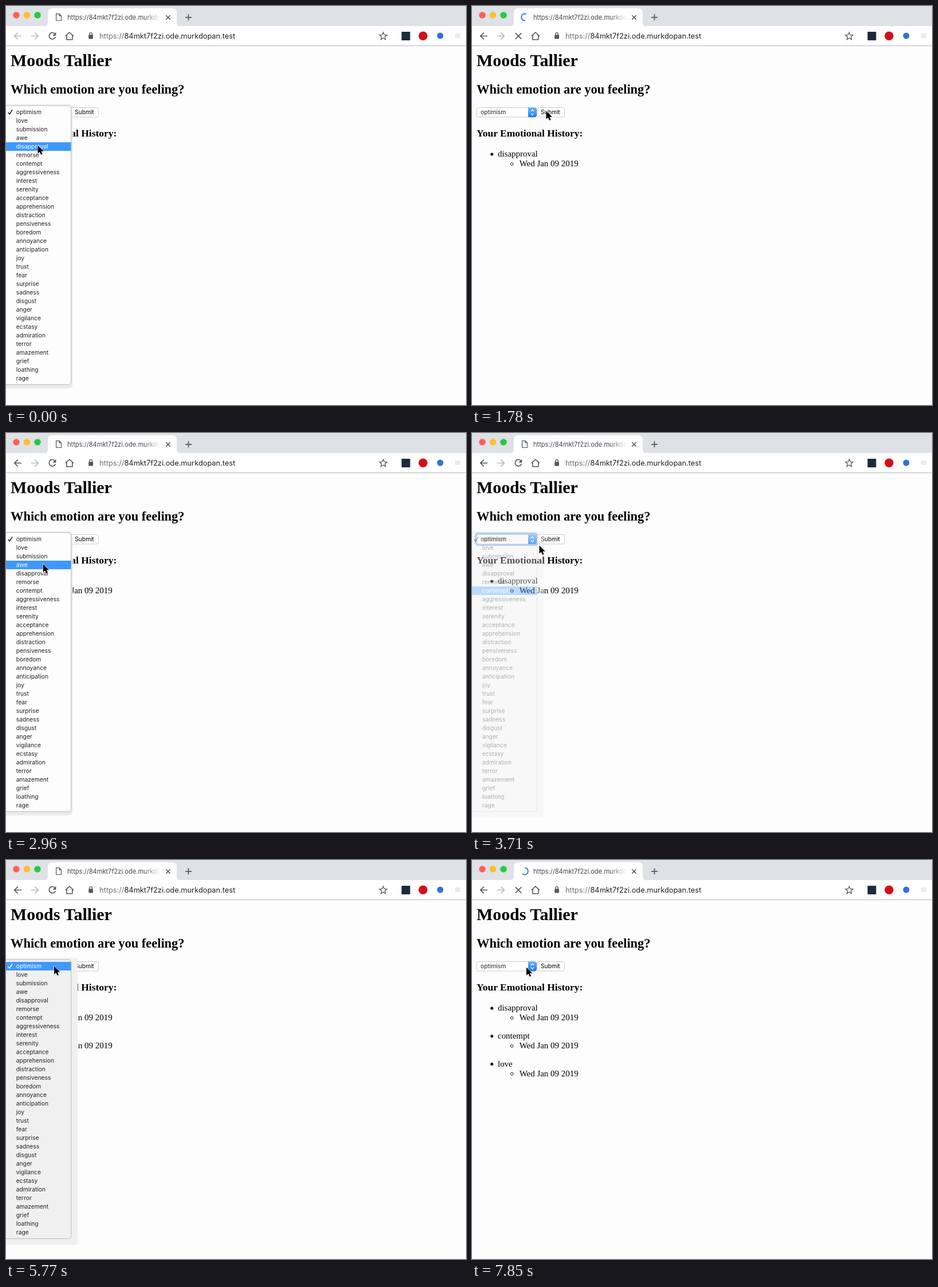
Write an HTML page that moves like this. It is 803 px wide and 697 px high and loops after 8000 ms.

```html
<!DOCTYPE html>
<html lang="en">
<head>
<meta charset="utf-8">
<title>Moods Tallier</title>
<style>
  html, body { margin: 0; width: 100%; height: 100%; overflow: hidden; background: #fdfdfd; }
  svg { display: block; }
  .ui { font: 10.25px Inter, "Open Sans", sans-serif; fill: #222; }
  .page { font: 14.95px "Liberation Serif", serif; fill: #000; }
  .h1 { font-size: 29.9px; font-weight: 700; }
  .h2 { font-size: 22.43px; font-weight: 700; }
  .h3 { font-size: 17.5px; font-weight: 700; }
  .tab { font-size: 11.1px; fill: #44474b; }
  .url { font-size: 12.8px; fill: #202124; }
  .icon { fill: none; stroke: #55585c; stroke-width: 1.7; }
  .on { fill: #fff; }
</style>
</head>
<body>
<svg width="803" height="697" viewBox="0 0 803 697">
  <defs>
    <linearGradient id="fade"><stop stop-color="#fff" stop-opacity="0"/><stop offset="1" stop-color="#fff"/></linearGradient>
    <linearGradient id="blue" x2="0" y2="1"><stop stop-color="#6cb5fb"/><stop offset="1" stop-color="#1679f4"/></linearGradient>
  </defs>
  <rect width="803" height="697" fill="#fdfdfd"/>

  <g id="browser">
    <rect width="803" height="36" fill="#dee1e6"/>
    <rect y="35" width="803" height="34" fill="#fff"/>
    <path d="M0 69.5H803" stroke="#b4b6b8"/>
    <path d="M65 36Q73 36 73 28V12Q73 4 81 4H290Q298 4 298 12V28Q298 36 306 36Z" fill="#fff"/>
    <circle cx="18" cy="16" r="5.8" fill="#ff5f57"/>
    <circle cx="36.5" cy="16" r="5.8" fill="#ffbd2e"/>
    <circle cx="55" cy="16" r="5.8" fill="#28c940"/>
    <path id="doc" class="icon" stroke-width="1.2" style="stroke-width:1.2" d="M87.6 13.6H93L96.5 17.2V25.5H87.6ZM93 13.6V17.2H96.5"/>
    <path id="spin" class="icon" style="stroke-width:2" d="M0.5 -6A6 6 0 1 1 -4 4.5"/>
    <text class="ui tab" x="107" y="23.5">https://84mkt7f2zi.ode.murkdo</text>
    <rect x="240" y="10" width="30" height="20" fill="url(#fade)"/>
    <path class="icon" style="stroke-width:1.5" d="M279.3 16.2l7.4 7.4m0-7.4l-7.4 7.4"/>
    <path class="icon" d="M313 19.8h11m-5.5-5.5v11"/>
    <path id="back" class="icon" d="M27 52.5H15M20.6 46.7L14.8 52.5L20.6 58.3"/>
    <path class="icon" style="stroke:#b9bbbe" d="M44 52.5H56M50.4 46.7L56.2 52.5L50.4 58.3"/>
    <g id="reload">
      <path class="icon" d="M85.6 48.8A5.7 5.7 0 1 0 86.4 54"/>
      <path d="M87.3 45.8V51.8H81.3Z" fill="#55585c"/>
    </g>
    <path id="stop" class="icon" d="M75.8 47.3l10.4 10.4m0-10.4l-10.4 10.4"/>
    <path class="icon" style="stroke-width:1.6" d="M103.8 52.6L110.8 46L117.8 52.6M105.8 51V58.8H115.8V51"/>
    <rect x="144.2" y="50.3" width="7.8" height="7.2" rx="1" fill="#55585c"/>
    <path class="icon" style="stroke-width:1.3" d="M145.8 51V49A2.3 2.3 0 0 1 150.4 49V51"/>
    <text class="ui url" x="163" y="57"><tspan fill="#6b6f74">https://</tspan>84mkt7f2zi.ode.murkdopan.test</text>
    <path class="icon" style="stroke-width:1.3" d="M658.5 46L660.3 50.4L665 50.8L661.4 53.9L662.5 58.5L658.5 56L654.5 58.5L655.6 53.9L652 50.8L656.7 50.4Z"/>
    <rect x="690.5" y="45" width="15" height="15" fill="#1d2a3d"/>
    <circle cx="728" cy="52.3" r="7.8" fill="#d2101c"/>
    <circle id="dot" cx="758" cy="52" r="5.5" fill="#2f73d6"/>
    <rect id="badge" x="756" y="54" width="15" height="11.5" rx="2" fill="#0a45d2"/>
    <rect x="784" y="48" width="9" height="8" fill="#ececee"/>
  </g>

  <g class="page">
    <text class="h1" x="8" y="105">Moods Tallier</text>
    <text class="h2" x="8" y="153">Which emotion are you feeling?</text>
    <text class="h3" x="8" y="228">Your Emotional History:</text>
    <g id="list"></g>
  </g>

  <g class="ui">
    <rect id="ring" x="6.3" y="175.8" width="108" height="19.6" rx="5" fill="none" stroke="#8fc1f7" stroke-width="3.4"/>
    <rect x="8" y="177.5" width="104.5" height="16.5" rx="3.5" fill="#fff" stroke="#c4c4c4" stroke-width=".9"/>
    <path d="M98 177.2H109Q112.8 177.2 112.8 181V190.5Q112.8 194.3 109 194.3H98Z" fill="url(#blue)"/>
    <path d="M102.8 184L105.4 181.2L108 184M102.8 187.6L105.4 190.4L108 187.6" fill="none" stroke="#fff" stroke-width="1.3"/>
    <text id="value" x="15" y="189.2"></text>
    <rect id="button" x="113.5" y="177.5" width="48" height="16.5" rx="3.5" stroke="#c4c4c4" stroke-width=".9"/>
    <text id="label" x="120" y="189.2">Submit</text>
  </g>

  <g id="menu" class="ui">
    <rect id="haze" y="171" width="125" height="501" fill="#f0f0f0"/>
    <rect id="shade" x="-8" y="172" width="124.5" height="496" rx="7" fill="#eaebeb"/>
    <rect id="sheet" x="-8" y="174" width="121.7" height="487.5" rx="5" stroke="#b9b9b9"/>
    <rect id="bar" width="113.5" height="15" fill="#3f98fd"/>
    <g id="rows"></g>
    <path id="check" d="M3.8 186L6.3 189L11 181.5" fill="none" stroke-width="1.6"/>
  </g>

  <path id="cursor" d="M0 0V14.2L3.3 11.2L5.6 16.3L8.1 15.2L5.9 10.3H10.3Z" stroke="#fff" stroke-width="1.1" paint-order="stroke"/>
</svg>

<script>
const LOOP = 8000, STEP = LOOP / 54, ROW = 15, TOP = 178;
const moods = `optimism love submission awe disapproval remorse contempt aggressiveness
  interest serenity acceptance apprehension distraction pensiveness boredom annoyance
  anticipation joy trust fear surprise sadness disgust anger vigilance ecstasy
  admiration terror amazement grief loathing rage`.split(/\s+/);

// One entry per choice, measured in steps
const rounds = [
  { open: -9, fade: 1, press: -1, load: 6, shown: 10, done: 13, pick: 4 },
  { open: 19, fade: 25, press: 28, load: 29, shown: 33, done: 36, pick: 6 },
  { open: 39, fade: 43, press: 46, load: 47, shown: 50, done: 54, pick: 1 }
];
const path = [
  [0, 55.5, 243.5], [4, 129.5, 183.5], [12, 129.5, 183.5], [18, 69.5, 184.5], [19, 69.5, 185],
  [21, 60, 273], [24, 60, 273], [25, 117.5, 196.5], [27, 139, 186], [33, 139, 186],
  [38, 84, 185.5], [40, 84, 185.5], [41, 81, 201], [42, 81, 201], [43, 114, 193],
  [44, 140, 186], [50, 140, 186], [53, 95, 187.5]
];

const $ = id => document.getElementById(id);
const set = (id, name, value) => $(id).setAttribute(name, value);
const show = (id, on) => { $(id).style.display = on ? "" : "none"; };

$("rows").innerHTML = moods.map((m, i) => `<text x="17.8" y="${189.2 + ROW * i}">${m}</text>`).join("");
$("list").innerHTML = rounds.map((r, i) => `<g transform="translate(0 ${48.8 * i})">
  <circle cx="34.7" cy="259" r="2.5"/><text x="45" y="263">${moods[r.pick]}</text>
  <circle cx="69.7" cy="276" r="2.3" fill="none" stroke="#000" stroke-width=".9"/>
  <text x="82.7" y="280">Wed Jan 09 2019</text></g>`).join("");
const rows = [...$("rows").children], items = [...$("list").children];

function pointer(k) {
  const i = Math.max(1, path.findIndex(p => p[0] >= k));
  const [k0, x0, y0] = path[i - 1], [k1, x1, y1] = path[i];
  const u = (k - k0) / (k1 - k0), e = u * u * (3 - 2 * u);
  return [x0 + (x1 - x0) * e, y0 + (y1 - y0) * e];
}

function draw(k) {
  const [x, y] = pointer(k);
  set("cursor", "transform", `translate(${x} ${y})`);

  const r = rounds.filter(r => k >= r.open).pop();
  const fading = k >= r.fade, closed = k >= r.fade + 2;
  const fresh = k === r.open || fading;
  const hot = fading ? r.pick : Math.floor((y - TOP) / ROW);
  set("menu", "opacity", closed ? 0 : !fading ? 1 : k === r.fade ? 0.35 : 0.12);
  show("haze", fresh && k < r.fade + 1);
  show("shade", !fresh);
  set("sheet", "fill", k > r.fade ? "#fdfdfd" : fresh ? "#f0f0f0" : "#fdfdfd");
  set("bar", "y", TOP + ROW * hot);
  set("check", "stroke", hot === 0 ? "#fff" : "#222");
  rows.forEach((row, i) => row.classList.toggle("on", i === hot));

  const pressed = k === r.press;
  show("ring", k < r.load);
  $("value").textContent = moods[closed && k < r.shown ? r.pick : 0];
  set("button", "fill", pressed ? "url(#blue)" : "#fff");
  set("label", "fill", pressed ? "#fff" : "#000");
  items.forEach((g, i) => { g.style.display = k >= rounds[i].shown ? "" : "none"; });

  const loading = k >= r.load && k < r.done;
  show("doc", !loading);
  show("spin", loading && k > r.load);
  set("spin", "transform", `translate(92 19.5) rotate(${(k - 53) * (k < r.shown ? -60 : 75)})`);
  $("spin").style.stroke = k < r.shown ? "#b5b8bc" : "#2f7de1";
  show("reload", !loading);
  show("stop", loading);
  $("back").style.stroke = k < rounds[0].shown ? "#b9bbbe" : "";
  const badge = k >= 13 && k < 20;
  show("badge", badge);
  set("dot", "fill", badge ? "#c3d0e2" : "#2f73d6");
}

function tick() {
  const t = performance.now() % LOOP;
  draw(Math.min(53, Math.floor((t + 12) / STEP)));
  requestAnimationFrame(tick);
}
tick();
</script>
</body>
</html>
```
